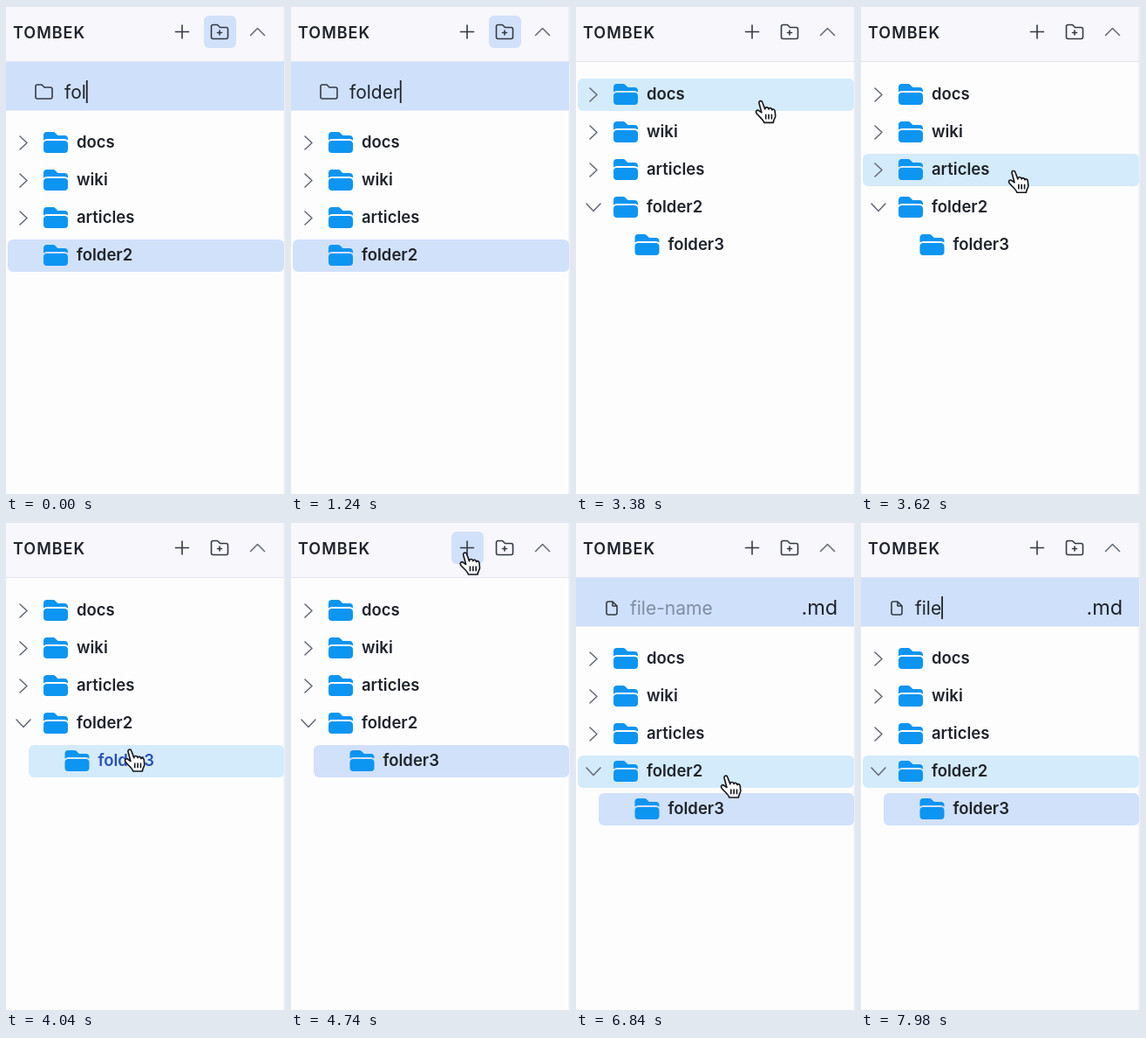
Animation of 320x558 px, one loop 8 s. Source, as an HTML page:

```html
<!DOCTYPE html>
<html lang="en">
<head>
<meta charset="utf-8">
<title>File tree</title>
<style>
  html, body { margin: 0; height: 100%; overflow: hidden; background: #fdfdfe; }
  svg { display: block; width: 100vw; height: 100vh; font-family: Inter, "Open Sans", sans-serif; fill: #1f232b; }
  .title { font-size: 18px; font-weight: 600; letter-spacing: 1px; }
  .label { font-size: 18.5px; font-weight: 600; }
  .field { font-size: 21px; }
  .line { fill: none; stroke: #353a44; stroke-width: 1.6; stroke-linecap: round; stroke-linejoin: round; }
  .thin { stroke: #666c78; }
</style>
</head>
<body>
<svg id="stage" viewBox="0 0 320 558">
  <defs>
    <path id="folder" fill="#0d95f2" transform="scale(1.333)" d="M19.5 21a3 3 0 0 0 3-3v-4.5a3 3 0 0 0-3-3h-15a3 3 0 0 0-3 3V18a3 3 0 0 0 3 3zM1.5 10.15V6a3 3 0 0 1 3-3h5.4a2.25 2.25 0 0 1 1.6.66l2.1 2.12a.75.75 0 0 0 .53.22H19.5a3 3 0 0 1 3 3v1.15A4.5 4.5 0 0 0 19.5 9h-15a4.5 4.5 0 0 0-3 1.15z"/>
    <path id="outline" class="line" d="M1 3a2 2 0 0 1 2-2h5l3 3h7a2 2 0 0 1 2 2v9a2 2 0 0 1-2 2H3a2 2 0 0 1-2-2z"/>
    <path id="file" class="line" d="M8 1H3a2 2 0 0 0-2 2v11a2 2 0 0 0 2 2h8a2 2 0 0 0 2-2V6L8 1v5h5"/>
    <path id="hand" fill="#fff" stroke="#15171c" stroke-width="1.7" stroke-linejoin="round" transform="translate(0 -1) scale(.96)" d="M-2 2C-3-1 1-2 2 1L5 9C5 6 9 6 9.500 9C10 7 13 7 13.500 10C14 8 17 9 17 12L17.500 17C17.500 20 15 21 15 25H4C3 21-2 18-5 14C-7 11-4 9-2 11L1 13zM6 15v6M9.500 15v6M13 15v6"/>
  </defs>
  <path fill="#f7f7fc" d="M0 0h320v63H0z"/>
  <path fill="#e4e5f2" d="M0 0h320v1H0zM0 63h320v1H0zM318.500 0h1v558h-1z"/>
  <g id="view"></g>
</svg>
<script>
const LOOP = 8000, BAND = "#cfe0fb", SELECTED = "#d2e1fa", HOVER = "#d4ebfb";
const SUBMIT = 1900, MOUSE_SHOWN = 2600, SELECT = 4150, OPEN_FILE = 4950;
const view = document.getElementById("view");

// Pointer stops: time, x, y of the fingertip
const stops = [
  [2975, 249, 30], [4000, 142, 262], [4300, 142, 262],
  [4800, 202, 28], [4980, 202, 28], [5420, 172, 292]
];
const folderKeys = [[-120, "fol"], [300, "fold"], [600, "folde"], [900, "folder"], [1480, "folder3"]];
const fileKeys = [[OPEN_FILE, ""], [6950, "f"], [7200, "fi"], [7480, "fil"], [7740, "file"]];

const lastBefore = (list, t) => list.filter(item => item[0] <= t).pop();

function pointer(t) {
  const from = lastBefore(stops, t) || stops[0];
  const to = stops[stops.indexOf(from) + 1];
  if (!to || t < from[0]) return { x: from[1], y: from[2] };
  const u = (t - from[0]) / (to[0] - from[0]), s = u * u * (3 - 2 * u);
  return { x: from[1] + (to[1] - from[1]) * s, y: from[2] + (to[2] - from[2]) * s };
}

const box = (x, y, w, h, fill) => `<rect x="${x}" y="${y}" width="${w}" height="${h}" rx="6" fill="${fill}"/>`;
const use = (id, x, y) => `<use href="#${id}" x="${x}" y="${y}"/>`;
const line = (d, extra = "") => `<path class="line ${extra}" d="${d}"/>`;
const text = (cls, x, y, str, fill = "#1f232b") => `<text class="${cls}" x="${x}" y="${y}" fill="${fill}">${str}</text>`;

function header(mouse) {
  const hovered = [184, 227, 270].find(x => mouse.x >= x && mouse.x < x + 37 && mouse.y > 11 && mouse.y < 48);
  return (hovered ? box(hovered, 11, 37, 37, SELECTED) : "") +
    text("title", 8, 36.5, "TOMBEK") +
    line("M194.500 29.500h15M202 22v15") +
    use("outline", 234.5, 20.5) + line("M242.500 30.500h5M245 28v5") +
    line("M280.500 33.500l8-8 8 8", "thin");
}

function row(name, cy, { chevron, indent = 0, selected, width }, mouse) {
  const left = indent ? 26 : 2, x = 81 + indent;
  const hovered = mouse.x > left && Math.abs(mouse.y - cy) < 18.5;
  const onLabel = hovered && mouse.x > x && mouse.x < x + width;
  const fill = hovered ? HOVER : selected ? SELECTED : "";
  const arrows = { right: `M16 ${cy - 7}l8 7.500-8 7.500`, down: `M12 ${cy - 4}l8 8.500 8-8.500` };
  return (fill ? box(left, cy - 18, 319 - left, 37, fill) : "") +
    (chevron ? line(arrows[chevron], "thin") : "") +
    use("folder", 41 + indent, cy - 16) +
    text("label", x, cy + 6, name, onLabel ? "#2850b8" : undefined);
}

function input(t, isFile) {
  const [keyTime, value] = lastBefore(isFile ? fileKeys : folderKeys, t);
  const x = isFile ? 62 : 67;
  const caretOn = (t - keyTime) % 1000 < 560;
  return `<path fill="${BAND}" d="M0 64h319v55H0z"/><path fill="#e6ebf6" d="M0 119h319v1H0z"/>` +
    (isFile ? use("file", 34, 90) + `<text x="258.5" y="106" font-size="23.5">.md</text>` : use("outline", 33, 89)) +
    (value ? `<text id="typed" class="field" x="${x}" y="105.500">${value}</text>`
           : text("field", x, 105.5, "file-name", "#808c9f")) +
    (caretOn ? `<rect id="caret" x="${x + 0.5}" y="85" width="1.800" height="26"/>` : "");
}

function draw(t) {
  const mouse = pointer(t), created = t >= SUBMIT, isFile = t >= OPEN_FILE;
  const open = !created || isFile, top = open ? 156 : 101;
  const rows = ["docs", "wiki", "articles"].map((name, i) =>
    row(name, top + 43 * i, { chevron: "right", width: [44, 36, 67][i] }, mouse));
  rows.push(row("folder2", top + 129, { chevron: created && "down", selected: !created, width: 65 }, mouse));
  if (created) rows.push(row("folder3", top + 172, { indent: 24.5, selected: t >= SELECT, width: 65 }, mouse));

  const mouseVisible = t >= MOUSE_SHOWN && t < fileKeys[1][0];
  view.innerHTML = header(mouse) + (open ? input(t, isFile) : "") + rows.join("") +
    (mouseVisible ? use("hand", mouse.x, mouse.y) : "");

  const typed = document.getElementById("typed"), caret = document.getElementById("caret");
  if (typed && caret) caret.setAttribute("x", +typed.getAttribute("x") + typed.getComputedTextLength());
}

function frame() {
  draw(performance.now() % LOOP);
  requestAnimationFrame(frame);
}
frame();
</script>
</body>
</html>
```
